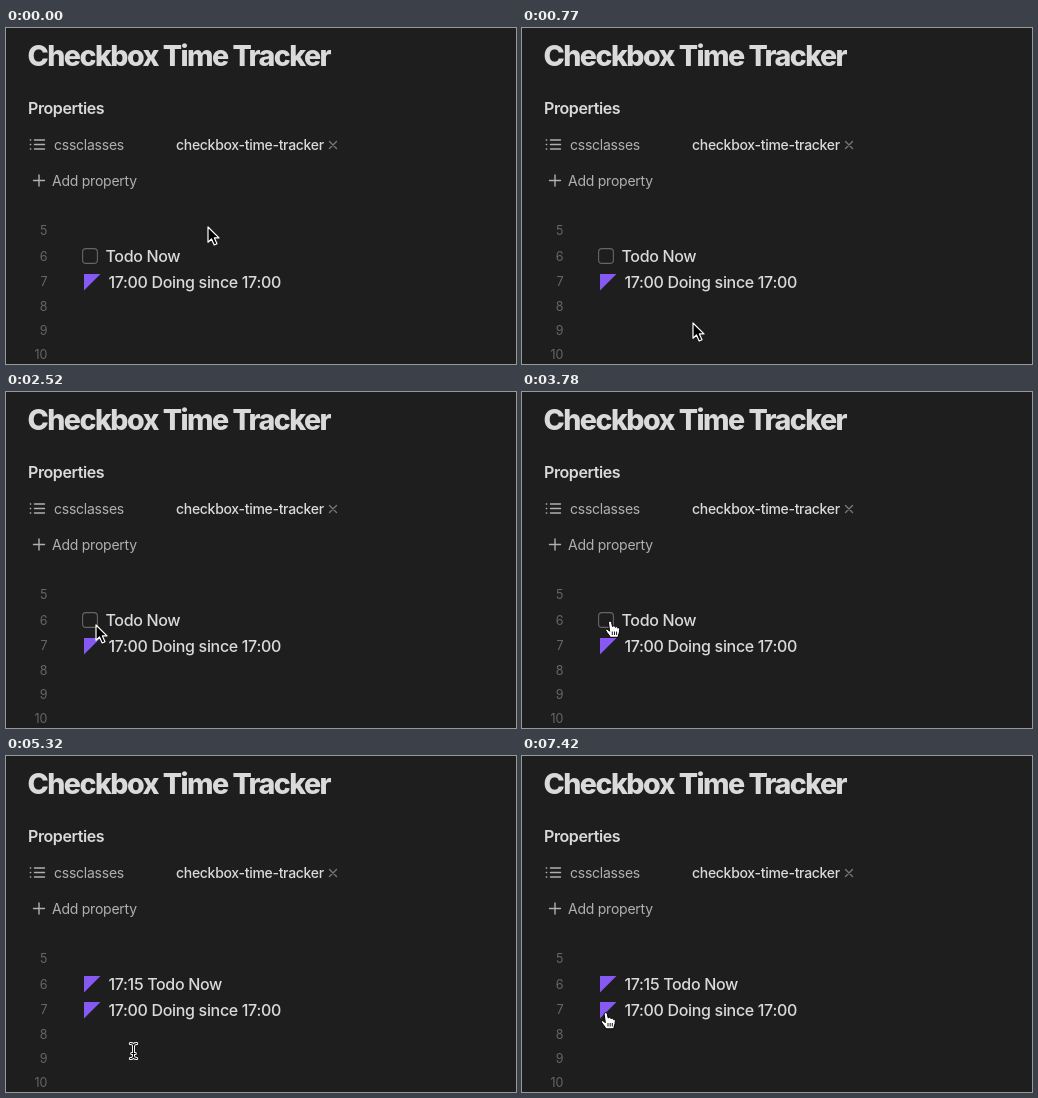
Animation of 510 by 336 pixels, one loop 8 s. Source, as an HTML page:

```html
<!DOCTYPE html>
<html lang="en">
<head>
<meta charset="utf-8">
<title>Checkbox Time Tracker</title>
<style>
html, body { margin: 0; width: 100%; height: 100%; overflow: hidden; background: #1e1e1e; }
svg { display: block; }
text { font-family: Inter, "Open Sans", sans-serif; fill: #dadada; white-space: pre; }
.title { font-size: 28.6px; font-weight: 800; letter-spacing: -1.55px; }
.head { font-size: 16px; font-weight: 600; letter-spacing: -.4px; }
.prop { font-size: 14px; font-weight: 500; letter-spacing: -.3px; }
.soft { fill: #b0b0b0; font-weight: 400; letter-spacing: -.24px; }
.line { font-size: 16px; font-weight: 500; letter-spacing: -.33px; }
.num { font-size: 12.5px; fill: #666; text-anchor: end; }
.icon { fill: none; stroke: #b0b0b0; stroke-width: 1.4; stroke-linecap: round; }
.mark { fill: #8559f2; }
</style>
</head>
<body>
<svg width="510" height="336" viewBox="0 0 510 336">
  <rect width="510" height="336" fill="#1e1e1e"/>
  <text class="title" x="21.5" y="38">Checkbox Time Tracker</text>
  <text class="head" x="22" y="86">Properties</text>
  <path class="icon" d="M28.500 112h10M28.500 116.500h10M28.500 121h10M24.300 112h.4M24.300 116.500h.4M24.300 121h.4"/>
  <text class="prop soft" x="48" y="122">cssclasses</text>
  <text class="prop" x="170" y="122">checkbox-time-tracker</text>
  <path class="icon" style="stroke:#777" d="M323.500 113.500l7 7m0-7l-7 7"/>
  <path class="icon" d="M27.500 152.500h11M33 147v11"/>
  <text class="prop soft" x="46" y="158">Add property</text>
  <g id="nums"></g>
  <g id="todo">
    <rect x="76.6" y="220.6" width="14.8" height="14.8" rx="3.5" fill="none" stroke="#666" stroke-width="1.1"/>
    <text class="line" x="99.5" y="234">Todo Now</text>
  </g>
  <g id="doing">
    <path class="mark" d="M78 220h16.500L78 236.500z"/>
    <text class="line" x="102.5" y="234">17:15 Todo Now</text>
  </g>
  <path class="mark" d="M78 246h16.500L78 262.500z"/>
  <text class="line" x="102.5" y="260">17:00 Doing since 17:00</text>
  <g id="arrow">
    <path d="M0 0V15.200L3.500 12L6.200 18L9 16.800L6.400 10.900H11z" fill="#000" stroke="#fff" stroke-width="1.2" stroke-linejoin="round"/>
  </g>
  <g id="hand">
    <path d="M-1.800 .8C-1.800-1.300 1-1.300 1.300 .6L2.200 4.500C3 3.300 5 3.800 5 5.300C6 4 7.300 4.700 7.300 6.100C8.500 5.100 9.400 6 9.300 7.800C9.200 11.300 8.300 11.800 7.700 15.300H-.2C-.8 12.800-3.300 11.300-4.500 8.600C-5 7.100-3.200 6.600-1.900 8.100L-.7 9.300z" fill="#fff" stroke="#000" stroke-width="1" stroke-linejoin="round"/>
    <path d="M2 9.500v3.500M4.200 9.500v3.500M6.300 9.500v3.500" stroke="#000" stroke-width=".9"/>
  </g>
  <g id="beam" fill="none" stroke="#fff" stroke-width="3" stroke-linecap="round">
    <path id="stem" d="M-3.200-7.500Q0-7.500 0-5Q0-7.500 3.200-7.500M0-5V5M-3.200 7.500Q0 7.500 0 5Q0 7.500 3.200 7.500M-1.800 2.500H1.800"/>
    <path d="M-3.200-7.500Q0-7.500 0-5Q0-7.500 3.200-7.500M0-5V5M-3.200 7.500Q0 7.500 0 5Q0 7.500 3.200 7.500M-1.800 2.500H1.800" stroke="#000" stroke-width="1.100"/>
  </g>
</svg>
<script>
const LOOP = 8000, TICK = 70, TOGGLE = 4200;
const $ = id => document.getElementById(id);
const cursors = ['arrow', 'hand', 'beam'];

$('nums').innerHTML = [207, 233, 258, 283, 307, 331]
  .map((y, i) => `<text class="num" x="41.5" y="${y}">${i + 5}</text>`).join('');

// [start, end, x, y]: the pointer eases to x, y between start and end
const moves = [
  [0, 0, 202, 199],
  [0, 770, 171, 295],
  [1190, 1330, 170, 294],
  [1890, 2520, 90, 233],
  [2590, 2730, 88, 230],
  [3710, 3850, 88.5, 230],
  [4410, 4620, 89, 231],
  [4760, 5320, 127.5, 295],
  [6230, 6860, 85, 257],
  [7280, 7350, 84, 257.5]
];

function pointerAt(t) {
  let x = 0, y = 0;
  for (const [a, b, tx, ty] of moves) {
    if (t < a) break;
    const u = b > a ? Math.min(1, (t - a) / (b - a)) : 1;
    const k = u * u * (3 - 2 * u);
    x += (tx - x) * k;
    y += (ty - y) * k;
  }
  return [x, y];
}

function shapeAt(t, x, y) {
  if (t < 2660) return 'arrow';
  return x < 95 && y < 263 ? 'hand' : 'beam';
}

function draw(now) {
  const t = Math.floor(now % LOOP / TICK) * TICK;
  const [x, y] = pointerAt(t);
  const shape = shapeAt(t, x, y);
  const show = (id, on) => $(id).style.display = on ? '' : 'none';
  show('todo', t < TOGGLE);
  show('doing', t >= TOGGLE);
  cursors.forEach(c => show(c, c === shape));
  $(shape).setAttribute('transform', `translate(${x.toFixed(1)} ${y.toFixed(1)})`);
}

const start = performance.now();
function frame() {
  draw(performance.now() - start);
  requestAnimationFrame(frame);
}
draw(0);
requestAnimationFrame(frame);
</script>
</body>
</html>
```
